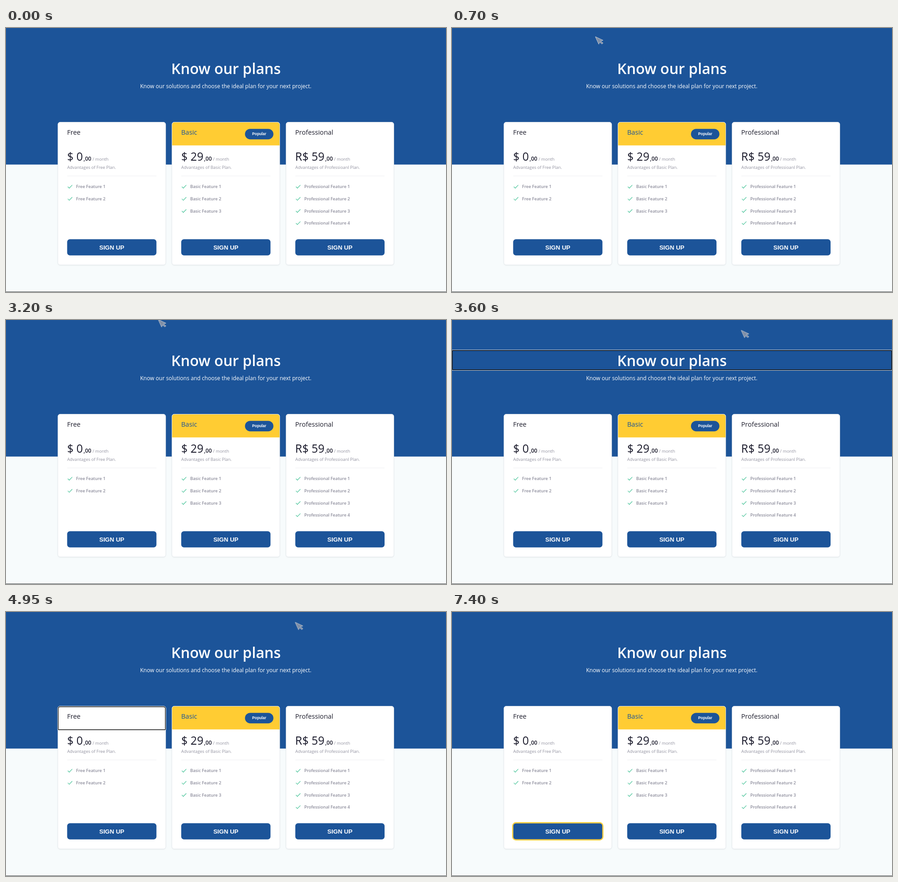
Recreate the animation shown at these times as an HTML page. Size 967 by 579 pixels, loop 8 s.

```html
<!DOCTYPE html>
<html lang="en">
<head>
<meta charset="utf-8">
<title>Know our plans</title>
<style>
  :root { --blue: #1c5499; --dark: #181a1b; --loop: 8s infinite; }
  html, body { margin: 0; width: 100%; height: 100%; overflow: hidden; background: #f7fbfc; }
  #stage { position: relative; width: 967px; height: 579px; overflow: hidden; }
  svg { display: block; font-family: "Open Sans", "Noto Sans", sans-serif; }

  .title { font-size: 32.2px; font-weight: 600; }
  .lead { font-size: 12.05px; }
  .title, .lead { fill: #fff; text-anchor: middle; }
  .card { fill: #fff; stroke: #e3e8ec; stroke-width: .8; filter: drop-shadow(0 1px 1px #0001); }
  .name { font-size: 14.6px; font-weight: 500; fill: #1e1e2d; }
  .name.hot { fill: var(--blue); }
  .price { font-size: 24.8px; font-weight: 500; fill: #1a1a2b; }
  .cents { font-size: 12.05px; font-weight: 600; }
  .month, .note { font-size: 9.4px; font-weight: 400; fill: #9292a0; }
  .feature { font-size: 9.37px; font-weight: 600; fill: #8b8b9a; }
  .rule { stroke: #eef0f2; }
  .check { fill: none; stroke: #55c8a0; stroke-width: 1.3; animation: check var(--loop) step-end; }
  .fill { fill: var(--blue); animation: fill var(--loop) step-end; }
  .label { font: bold 13.4px "Liberation Sans", Arial, sans-serif; fill: #fff;
    text-anchor: middle; animation: label var(--loop) step-end; }
  .label.small { font-size: 8.3px; }
  .focus { fill: none; stroke: #fc3; stroke-width: 0; animation: focus var(--loop) step-end; }

  #ring { position: absolute; visibility: hidden; border-radius: 2px;
    box-shadow: 0 0 0 .8px #fff, inset 0 0 0 1.4px #101010;
    animation: ring var(--loop) step-end; }
  #cursor { animation: move var(--loop) step-end; }
  #cursor path { fill: #ef5f7c; stroke: #f8c4c8; stroke-width: 1; stroke-linejoin: round;
    animation: tint var(--loop) step-end; }

  /* page reload: dark flash that fades back in steps */
  @keyframes fill {
    0% { fill: var(--blue); }
    6.25% { fill: var(--dark); animation-timing-function: steps(4); }
    8.75%, 100% { fill: var(--blue); }
  }
  @keyframes label {
    0% { fill: #fff; }
    6.25% { fill: #e8e6e3; animation-timing-function: steps(4); }
    8.75%, 100% { fill: #fff; }
  }
  @keyframes check {
    0% { visibility: visible; }
    6.25% { visibility: hidden; }
    7.5%, 100% { visibility: visible; }
  }
  /* keyboard focus going down the page */
  @keyframes ring {
    0% { visibility: hidden; }
    45% { visibility: visible; left: 0; top: 66px; width: 967px; height: 44px; }
    54.375% { visibility: visible; left: 0; top: 110px; width: 967px; height: 29px; }
    61.875% { visibility: visible; left: 114px; top: 207px; width: 237px; height: 51.5px; border-radius: 5px 5px 2px 2px; }
    72.5% { visibility: visible; left: 133.5px; top: 341.3px; width: 198px; height: 14.7px; border-radius: 2px; }
    82.5% { visibility: visible; left: 133.5px; top: 368px; width: 198px; height: 14.7px; border-radius: 2px; }
    90%, 100% { visibility: hidden; }
  }
  @keyframes focus {
    0% { stroke-width: 0; }
    90% { stroke-width: 0; animation-timing-function: steps(4); }
    92.5%, 100% { stroke-width: 2.4px; }
  }
  @keyframes move {
    0% { visibility: hidden; transform: translate(315px, 19px); }
    8.75% { visibility: visible; transform: translate(315px, 19px); }
    9.375% { visibility: visible; transform: translate(315px, 30px); }
    18.75% { visibility: visible; transform: translate(325px, 14px); }
    19.375% { visibility: visible; transform: translate(334.5px, -1px); }
    40% { visibility: visible; transform: translate(334.5px, -1px); animation-timing-function: steps(3); }
    41.875% { visibility: visible; transform: translate(430px, 75px); animation-timing-function: steps(2); }
    43.125% { visibility: visible; transform: translate(540px, 100px); animation-timing-function: steps(3); }
    45% { visibility: visible; transform: translate(635.5px, 22.5px); }
    70%, 100% { visibility: hidden; transform: translate(635.5px, 22.5px); }
  }
  @keyframes tint {
    0% { fill: #7f8ea6; stroke: #c3cad3; }
    11.25% { fill: #ef5f7c; stroke: #f8c4c8; }
    40%, 100% { fill: #7f8ea6; stroke: #c3cad3; }
  }
</style>
</head>
<body>
<div id="stage">
  <svg width="967" height="579" viewBox="0 0 967 579">
    <rect width="967" height="579" fill="#f7fbfc"/>
    <rect width="967" height="299.5" fill="#1c5499"/>
    <rect y="578" width="967" height="1" fill="#4b4d50"/>
    <text class="title" x="483.5" y="100.5">Know our plans</text>
    <text class="lead" x="483" y="132">Know our solutions and choose the ideal plan for your next project.</text>
    <g id="cards"></g>
    <rect class="focus" x="133.4" y="462.2" width="198.2" height="37.6" rx="7"/>
  </svg>
  <div id="ring"></div>
  <svg width="967" height="579" style="position:absolute;left:0;top:0">
    <g id="cursor"><path d="M0 0 17 8 11.500 9.500 17 14 14.500 16 9.500 12 7.500 16.500Z"/></g>
  </svg>
</div>
<script>
  const plans = [
    { name: "Free", price: "$ 0", note: "Free", count: 2 },
    { name: "Basic", price: "$ 29", note: "Basic", count: 3, hot: true },
    { name: "Professional", price: "R$ 59", note: "Professioanl", count: 4 }
  ];

  const text = (cls, x, y, body) => `<text class="${cls}" x="${x}" y="${y}">${body}</text>`;

  const feature = (name, i) => {
    const y = 26.65 * i;
    return `<path class="check" d="M21.800 ${348 + y}l3.200 3.200 6.600-6.800"/>` +
      text("feature", 40, 351.2 + y, `${name} Feature ${i + 1}`);
  };

  const badge = `<path d="M.5 257.500V212a5 5 0 0 1 5-5h226a5 5 0 0 1 5 5v45.500z" fill="#fc3"/>
    <rect class="fill" x="160.500" y="221.200" width="62.500" height="23" rx="11.500"/>` +
    text("label small", 191.8, 235.4, "Popular");

  const card = (p, i) => `<g transform="translate(${114 + 250.7 * i} 0)">
    <rect class="card" y="206.500" width="237" height="313" rx="5"/>
    ${p.hot ? badge : ""}
    ${text(p.hot ? "name hot" : "name", 20.2, 234, p.name)}
    ${text("price", 20.2, 290.7, p.price +
      `<tspan class="cents" dx="1.500">,00</tspan><tspan class="month" dx="2.700">/ month</tspan>`)}
    ${text("note", 20.4, 309.3, `Advantages of ${p.note} Plan.`)}
    <path class="rule" d="M20.500 324.500h196"/>
    ${Array.from({ length: p.count }, (_, n) => feature(p.name, n)).join("")}
    <rect class="fill" x="20.400" y="463.200" width="196.200" height="35.600" rx="6"/>
    ${text("label", 118.5, 485.7, "SIGN UP")}
  </g>`;

  document.getElementById("cards").innerHTML = plans.map(card).join("");
</script>
</body>
</html>
```
